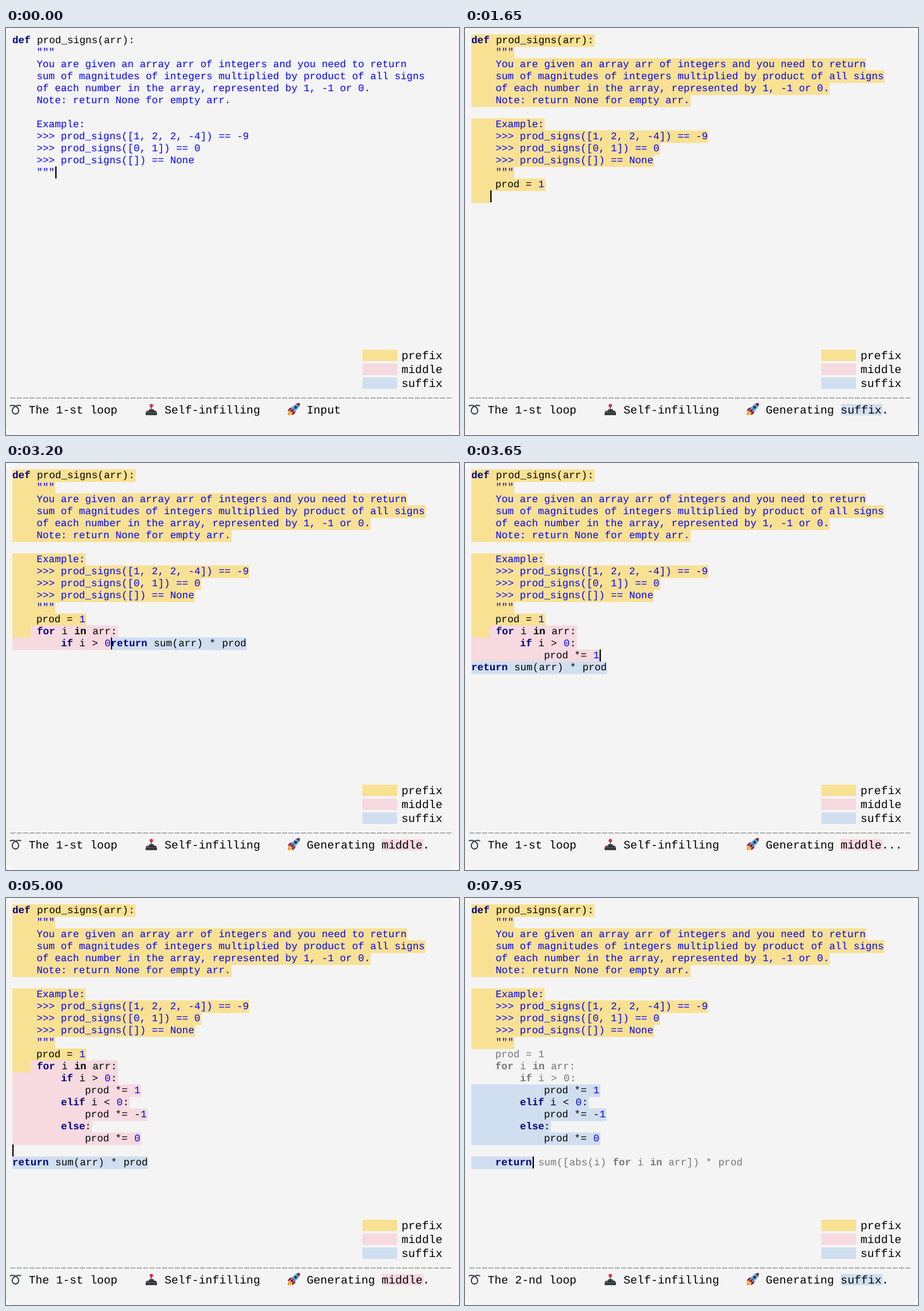
An HTML page with a canvas that plays this animation: 717x644 px, repeating every 8 s.

```html
<!DOCTYPE html>
<html lang="en">
<head>
<meta charset="utf-8">
<title>Self-infilling</title>
<style>
  html, body { margin: 0; width: 100%; height: 100%; overflow: hidden; background: #fff; }
  canvas { display: block; }
</style>
</head>
<body>
<canvas id="stage" width="717" height="644"></canvas>
<script>
const ctx = document.getElementById('stage').getContext('2d');
const LOOP = 8000, STEP = 50;
const LEFT = 10, TOP = 10, LINE = 19, CHAR = 9.6016, UI_CHAR = 10.802;
const COLORS = { prefix: '#f9e193', middle: '#f7d9e0', suffix: '#d0dff0' };
const GREY = '#777777';
const MONO = '"Liberation Mono", monospace';

const doc = `def prod_signs(arr):
    """
    You are given an array arr of integers and you need to return
    sum of magnitudes of integers multiplied by product of all signs
    of each number in the array, represented by 1, -1 or 0.
    Note: return None for empty arr.

    Example:
    >>> prod_signs([1, 2, 2, -4]) == -9
    >>> prod_signs([0, 1]) == 0
    >>> prod_signs([]) == None
    """`;
const DOC_LAST_ROW = 11;

// Model tokens, separated by "|"; one appears per step.
const tokens = text => text.split('|');
const take = (list, count) => list.slice(0, count).join('');
const prefixTokens = tokens('\n|   | prod| =| |1|\n|   ');
const suffixTokens = tokens('return| sum|(|arr|)| *| prod');
const middleTokens = tokens(
  ' for| i| in| arr|:|\n|       | if| i| >| |0|:|\n|           | prod| *|=| |1|\n' +
  '|       | elif| i| <| |0|:|\n|           | prod| *|=| -|1|\n' +
  '|       | else|:|\n|           | prod| *|=| |0|\n|\n|    ');
const finalTokens = tokens('return| sum|([|abs|(|i|)| for| i| in| arr|])| *| prod');

const prefix = doc + prefixTokens.join('');
const suffix = suffixTokens.join('');
const middle = middleTokens.join('');
const branches = middle.slice(middle.indexOf('            prod'));
const heading = '\n    prod = 1\n    for i in arr:\n        if i > 0:\n';

const part = (text, kind) => ({ text, kind });
const caret = (offset = 1) => ({ caret: offset });

// Everything visible at time t: code parts and the status line.
function sceneAt(t) {
  const step = (start, last) => Math.min(last, Math.floor((t - start) / STEP));
  const scene = (parts, part, k, mode = 'Self-infilling', loop = '1-st') =>
    ({ parts, part, dots: '.'.repeat(1 + (k >> 2) % 3), mode, loop });

  if (t < 550) return scene([part(doc), caret()], '', 0);
  if (t < 1650) {
    const k = step(550, 11);
    return scene([part(doc + take(prefixTokens, k), 'prefix'), caret()], 'prefix', k);
  }
  if (t < 2600) {
    const k = step(1650, 8);
    return scene([part(prefix, 'prefix'), part(take(suffixTokens, k), 'suffix'), caret()], 'suffix', k);
  }
  if (t < 5600) {
    const k = step(2600, 49);
    return scene([part(prefix, 'prefix'), part(take(middleTokens, k), 'middle'),
      caret(0), part(suffix, 'suffix')], 'middle', k);
  }
  const start = [part(prefix, 'prefix'), part(middle, 'middle')];
  if (t < 6650) return scene([...start, caret(), part(suffix, 'old')], 'suffix', 0, 'Left-to-right');
  if (t < 7950) {
    const k = step(6650, 14);
    return scene([...start, part(take(finalTokens, k), 'suffix'), caret()], 'suffix', k, 'Left-to-right');
  }
  return scene([part(doc, 'prefix'), part(heading, 'old'), part(branches + 'return', 'suffix'),
    caret(), part(take(finalTokens.slice(1)), 'old')], 'suffix', 0, 'Self-infilling', '2-nd');
}

function box(x, y, w, h, color) {
  ctx.fillStyle = color;
  ctx.fillRect(x, y, w, h);
}

function write(text, x, y, size, color = '#000', bold = false) {
  ctx.font = `${bold ? 'bold ' : ''}${size}px ${MONO}`;
  ctx.fillStyle = color;
  ctx.fillText(text, x, y);
}

function syntax(word, row) {
  if (row >= 1 && row <= DOC_LAST_ROW) return ['#0000ff', false];
  if (/^(def|for|if|elif|else|return)$/.test(word)) return ['#000080', true];
  if (word === 'in') return ['#000', true];
  return [/^\d+$/.test(word) ? '#0000ff' : '#000', false];
}

function drawCode(parts) {
  let x = LEFT, row = 0, lineEnd = null, cursor;
  const words = [];
  for (const { text, kind, caret } of parts) {
    if (caret !== undefined) {
      // After a line break the caret waits at the end of the line before.
      const at = lineEnd || { x, row };
      cursor = { x: at.x + caret, y: TOP + at.row * LINE };
      continue;
    }
    text.split('\n').forEach((line, i) => {
      if (i) {
        lineEnd = { x, row };
        x = LEFT;
        row++;
      }
      const isDoc = row >= 1 && row <= DOC_LAST_ROW;
      for (const word of line.match(isDoc ? /.+/g : /\w+|\s+|./g) || []) {
        const width = Math.round(word.length * CHAR);
        const y = TOP + row * LINE;
        if (COLORS[kind]) box(x, y, width + 1, LINE + 1, COLORS[kind]);
        words.push({ word, x, y, row, kind });
        x += width;
        lineEnd = null;
      }
    });
  }
  for (const { word, x, y, row, kind } of words) {
    const [color, bold] = syntax(word, row);
    write(word, x, y + 14, 16, kind === 'old' ? GREY : color, bold);
  }
  box(cursor.x, cursor.y, 2, LINE, '#000');
}

function shape(d, fill, stroke, width = 1) {
  const path = new Path2D(d);
  if (fill) { ctx.fillStyle = fill; ctx.fill(path); }
  if (stroke) { ctx.strokeStyle = stroke; ctx.lineWidth = width; ctx.stroke(path); }
}

// Icons sit in a 20 x 20 square.
const icons = {
  loop() {
    shape('M1 4.5C7 2 15 6 15 12C15 19 5 19 5 12C5 6 13 2 19 4.5', null, '#2f3b42', 1.8);
  },
  joystick() {
    shape('M9.2 6h1.8v7h-1.8z', '#66757f');
    shape('M7 9.5h6.5l1 3h-8.5z', '#3c474d');
    shape('M3 12h14l2 3v4h-18v-4z', '#292f33');
    shape('M1 15.3h18', null, '#66757f', 1);
    shape('M3.2 13.2h3', null, '#dd2e44', 1.4);
    shape('M10 1.2a2.8 2.8 0 1 1-.01 0z', '#dd2e44');
  },
  rocket() {
    shape('M1 19C1 14 3 12 6 12L8 15C7 18 5 19 1 19z', '#f4900c');
    shape('M2.5 17.5C3 15 4 14 6 13.5L7 15C6 17 5 17 2.5 17.5z', '#ffcc4d');
    shape('M8 7C4 7 2 9 1 13L6 11z M13 12C13 16 11 18 7 19L9 14z', '#a0041e');
    shape('M20 0C13 0 8 5 5 12L8 15C15 12 20 7 20 0z', '#55acee');
    shape('M20 0C18 0 16 .4 14.5 1L19 5.5C19.7 4 20 2 20 0z', '#a0041e');
    shape('M13.5 4.5a2.2 2.2 0 1 1-.01 0z', '#292f33');
    shape('M5 12L8 15L11.5 8.5z', '#a0041e');
  }
};

function drawIcon(name, x) {
  ctx.save();
  ctx.translate(x, 593.5);
  icons[name]();
  ctx.restore();
}

function drawStatus({ part, dots, mode, loop }) {
  const baseline = 610;
  let x = 5;
  const item = (icon, text) => {
    drawIcon(icon, x);
    write(text, x + 31, baseline, 18);
    x = Math.round(x + 31 + (text.length + 4) * UI_CHAR);
  };
  item('loop', `The ${loop} loop`);
  item('joystick', mode);
  item('rocket', part ? 'Generating' : 'Input');
  if (!part) return;
  const partX = x - 3 * UI_CHAR;
  box(Math.round(partX + .6), 595, 66, 18, COLORS[part]);
  write(part + dots, partX, baseline, 18);
}

function drawLegend() {
  Object.keys(COLORS).forEach((name, i) => {
    box(564, 509 + i * 22, 55, 18, COLORS[name]);
    write(name, 626, 524 + i * 22, 18);
  });
  for (let x = 7; x < 705; x += 10) box(x, 585, 8, 1, '#777');
}

function frame() {
  const scene = sceneAt(performance.now() % LOOP);
  box(0, 0, 717, 644, '#fff');
  ctx.fillStyle = '#f4f4f4';
  ctx.beginPath();
  ctx.roundRect(0, 0, 717, 644, 14);
  ctx.fill();
  drawCode(scene.parts);
  drawLegend();
  drawStatus(scene);
  requestAnimationFrame(frame);
}

ctx.textRendering = 'geometricPrecision';
frame();
</script>
</body>
</html>
```
